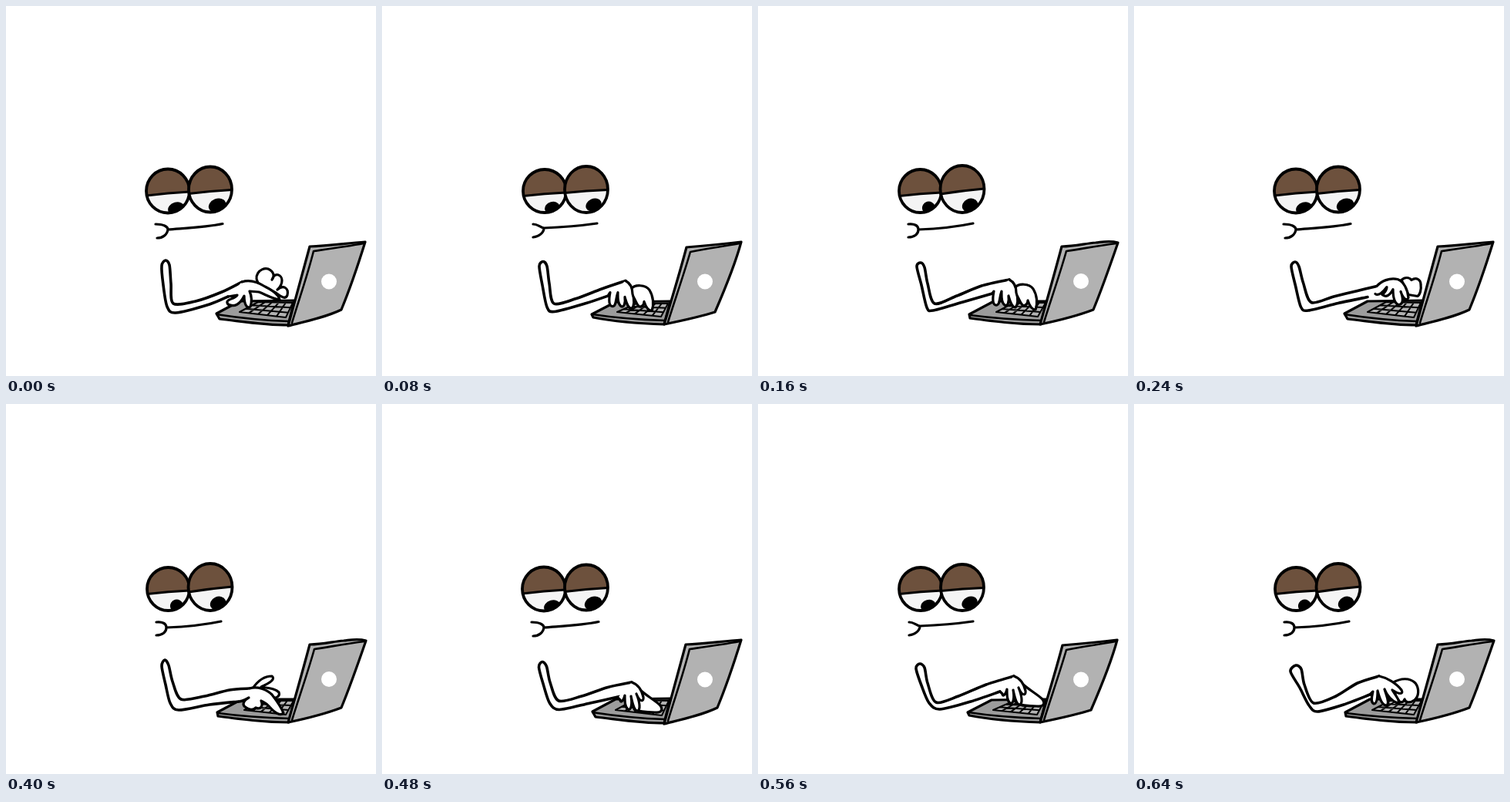
An HTML page for the animation above (0.72 s loop, 480x480 px).

```html
<!DOCTYPE html>
<html lang="en">
<head>
<meta charset="utf-8">
<title>Typing</title>
<style>
html, body { margin: 0; width: 100%; height: 100%; overflow: hidden; background: #fff; }
svg { display: block; width: 100vw; height: 100vh; }
</style>
</head>
<body>
<svg id="stage" viewBox="0 0 480 480" stroke="#000" stroke-linecap="round" stroke-linejoin="round"></svg>
<script>
const STEP = 80, STEPS = 9;
const BROWN = '#6d513d', GREY = '#b2b2b2', DARK = '#9c9c9c';

// Three redrawn versions of face and laptop give the line boil.
// eye: cx, cy, rx, ry; lid: left y, right y; pupil: cx, cy, rx, ry, angle
const looks = [
  {
    eyes: [
      { eye: [210, 240, 28, 28.5], lid: [246, 241], pupil: [221, 263, 11, 8.5, -15] },
      { eye: [265, 238, 28, 29.5], lid: [243.5, 238.5], pupil: [274, 258.5, 11.5, 8.5, -22] }
    ],
    mouth: 'M194 283C204 283 210 286 210 290C209 297 203 301 196 301M210 290C235 288 260 287 281 282.5',
    base: 'M273 399L303 383L374 382L366 414C335 414 305 409 277 406Z',
    edge: 'M273 400C305 405 335 408 367 409',
    keys: [[303, 397], [327, 384], [372, 385], [363, 404]],
    lid: 'M394 312C418 311 440 308 466 306C457 335 447 365 435 394C414 404 390 409 366 415C375 381 385 346 394 312Z',
    face: 'M399 318C420 315 442 312 464 308M399 318C391 350 380 381 371 411',
    badge: [419, 357.5]
  },
  {
    eyes: [
      { eye: [211, 240, 28, 28], lid: [246.5, 242], pupil: [221, 262, 10, 8, -15] },
      { eye: [265, 238, 28, 30], lid: [242.5, 238.5], pupil: [274.5, 258, 10.5, 8, -25] }
    ],
    mouth: 'M196 283C202 283 205 287 210 288C210 294 204 299 196 300M210 288C235 287 258 285 279 282',
    base: 'M272 400L303 384L374 383L366 413C335 412 305 410 274 404Z',
    edge: 'M273 400C305 405 335 407 367 408',
    keys: [[305, 397], [330, 386], [371, 386], [362, 403]],
    lid: 'M395 313C418 311 440 309 466 306C458 336 445 367 432 397C414 403 390 408 366 413C376 380 386 347 395 313Z',
    face: 'M400 319C420 315 442 312 464 308M400 319C391 350 380 381 371 410',
    badge: [419, 357.5]
  },
  {
    eyes: [
      { eye: [210.5, 240, 27.5, 28], lid: [246.5, 242], pupil: [221.5, 262, 8.5, 8.5, -15] },
      { eye: [265, 237.5, 28.5, 30.5], lid: [244, 237], pupil: [275, 258.5, 10.5, 8.5, -25] }
    ],
    mouth: 'M195 283C203 282 208 285 208 290C208 296 203 300 195 300M208 290C235 289 260 286 279 282',
    base: 'M274 400L306 383L374 383L367 413C335 413 305 409 275 405Z',
    edge: 'M275 401C305 405 335 407 368 408',
    keys: [[309, 397], [332, 385], [373, 385], [363, 403]],
    lid: 'M394 312C412 312 424 308 438 307C448 306 456 304 467 307C457 336 447 365 435 394C414 402 390 408 366 413C375 381 385 346 394 312Z',
    face: 'M400 318C420 315 442 311 465 308M400 318C391 350 380 381 371 410',
    badge: [419, 357]
  }
];

// arm: points from the lower wrist round the shoulder to the upper wrist
const poses = {
  0: {
    arm: [288, 377, 264, 387, 220, 398, 209, 390, 204, 362, 202, 337, 207, 330, 212, 336, 214, 360, 217, 386, 246, 383, 280, 371, 306, 358],
    far: 'M330 362C318 352 330 338 340 341C349 345 348 352 345 355C349 344 358 349 358 356C358 363 354 366 352 368C360 361 367 366 365 375C363 381 358 378 350 372Z',
    near: 'M306 358C318 354 328 359 336 364C346 369 354 375 355 381C346 380 336 374 328 371L316 370C319 377 319 384 317 390C313 393 309 388 309 376C303 388 296 391 288 387C283 380 296 381 300 375L288 377'
  },
  2: {
    arm: [304, 373, 266, 384, 227, 395, 219, 391, 212, 362, 206, 338, 211, 333, 216, 339, 220, 360, 229, 386, 258, 376, 290, 363, 326, 355],
    far: 'M333 366C338 359 352 360 357 367C362 375 363 386 360 394C355 394 352 388 350 382C350 386 347 390 343 388C339 384 338 376 334 374Z',
    near: 'M326 355C332 358 335 364 335 372C338 380 337 388 334 391C329 391 327 383 325 376C326 384 324 390 320 388C315 384 316 376 316 370C313 378 314 387 310 388C304 389 304 380 306 370L304 373'
  },
  4: {
    arm: [302, 382, 264, 387, 225, 395, 214, 390, 207, 364, 202, 338, 207, 331, 212, 337, 219, 358, 231, 383, 260, 378, 290, 376, 304, 372],
    far: 'M336 364C340 360 346 360 349 364C355 360 361 363 361 370C362 376 360 383 357 385L345 383Z',
    near: 'M304 372C310 365 320 361 331 363C339 366 344 376 345 387C343 392 338 388 335 379C339 389 338 396 332 396C327 394 325 386 325 376C321 384 316 387 311 383C316 379 317 376 317 373C312 380 306 385 302 382'
  },
  5: {
    arm: [302, 386, 264, 390, 224, 397, 213, 388, 207, 364, 202, 340, 206, 332, 211, 339, 216, 360, 227, 383, 258, 379, 290, 371, 316, 369],
    far: 'M320 369C326 360 334 353 345 353C350 357 342 362 331 367C342 369 349 369 354 374C356 379 350 383 344 380Z',
    near: 'M316 369C326 366 338 370 345 377C352 386 358 396 360 401C356 405 349 401 342 393C338 388 334 387 331 385C334 392 330 397 324 394C320 398 314 396 309 392C306 388 310 384 315 381C308 385 305 386 302 386'
  },
  7: {
    arm: [314, 373, 276, 386, 236, 396, 222, 388, 212, 365, 205, 343, 210, 337, 216, 342, 220, 362, 231, 387, 260, 379, 296, 364, 332, 353],
    far: 'M342 362C350 370 362 376 369 383C373 389 370 393 362 392C352 392 342 392 335 388Z',
    near: 'M332 353C341 356 345 364 347 372C348 378 343 380 338 368C343 380 343 388 340 390C335 391 333 380 331 371C333 382 331 390 327 388C323 385 323 378 323 370C321 378 317 380 317 376L314 373'
  },
  8: {
    arm: [306, 377, 272, 390, 238, 399, 227, 391, 215, 368, 203, 347, 210, 339, 217, 344, 221, 364, 233, 388, 262, 379, 290, 362, 318, 353],
    far: 'M335 362C346 355 358 355 365 362C371 370 369 380 364 384C357 389 352 387 351 383C349 388 345 388 343 384L340 380Z',
    near: 'M318 353C328 355 340 362 347 371C350 377 344 377 335 371C340 379 346 386 342 388C335 386 328 378 325 370C328 380 332 388 328 391C322 392 318 380 316 372C316 382 315 389 311 389C306 386 309 378 310 373L306 377'
  }
};

// In-between poses: average the arms and carry the later hand to the new wrist.
function between(a, b) {
  const arm = a.arm.map((v, i) => (v + b.arm[i]) / 2);
  const shift = [24, 25].map(i => arm[i] - b.arm[i]);
  return { ...b, arm, shift };
}
poses[1] = between(poses[0], poses[2]);
poses[3] = between(poses[2], poses[4]);
poses[6] = between(poses[5], poses[7]);

const path = (d, fill = 'none', width = 3.2) =>
  `<path d="${d}" fill="${fill}" stroke-width="${width}"/>`;

function spline(list) {
  const pts = [];
  for (let i = 0; i < list.length; i += 2) pts.push([list[i], list[i + 1]]);
  const at = i => pts[Math.max(0, Math.min(pts.length - 1, i))];
  let d = `M${pts[0]}`;
  for (let i = 0; i < pts.length - 1; i++) {
    const [p, q, r, s] = [at(i - 1), at(i), at(i + 1), at(i + 2)];
    const c1 = q.map((v, k) => v + (r[k] - p[k]) / 7);
    const c2 = r.map((v, k) => v - (s[k] - q[k]) / 7);
    d += `C${c1} ${c2} ${r}`;
  }
  return d;
}

function eyeball({ eye: [cx, cy, rx, ry], lid: [l, r], pupil: [px, py, pw, ph, turn] }, id) {
  const shape = `<ellipse cx="${cx}" cy="${cy}" rx="${rx}" ry="${ry}"`;
  const x0 = cx - rx, x1 = cx + rx;
  return `<clipPath id="${id}">${shape}/></clipPath>
    <g clip-path="url(#${id})">
      ${shape} fill="#f4f4f4" stroke="none"/>
      <ellipse cx="${px}" cy="${py}" rx="${pw}" ry="${ph}" transform="rotate(${turn} ${px} ${py})" fill="#000" stroke="none"/>
      ${path(`M${x0} ${l}L${x1} ${r}V${cy - ry - 4}H${x0}Z`, BROWN, 0)}
      ${path(`M${x0} ${l}Q${cx} ${(l + r) / 2 - 1} ${x1} ${r}`)}
    </g>
    ${shape} fill="none" stroke-width="3.8"/>`;
}

function keyboard([a, b, c, d]) {
  const mix = (p, q, k) => p.map((v, i) => v + (q[i] - v) * k);
  let lines = `M${a}L${b}L${c}L${d}Z`;
  for (const k of [1 / 3, 2 / 3]) lines += `M${mix(a, b, k)}L${mix(d, c, k)}`;
  for (const k of [0.2, 0.4, 0.6, 0.8]) lines += `M${mix(a, d, k)}L${mix(b, c, k)}`;
  return path(lines, GREY, 2);
}

function scene(n) {
  const look = looks[n % 3], pose = poses[n];
  const [dx, dy] = pose.shift || [0, 0];
  const hand = d => `<g transform="translate(${dx} ${dy})">${path(d, '#fff', 3.2)}</g>`;
  const [bx, by] = look.badge;
  return look.eyes.map((e, i) => eyeball(e, `eye${i}`)).join('') +
    path(look.mouth) +
    path(look.base, DARK) + path(look.edge, 'none', 2.4) + keyboard(look.keys) +
    hand(pose.far) + path(spline(pose.arm), '#fff', 3.6) + hand(pose.near) +
    path(look.lid, GREY) + path(look.face, 'none', 2.6) +
    `<circle cx="${bx}" cy="${by}" r="10" fill="#fff" stroke="none"/>`;
}

const stage = document.getElementById('stage');
const start = performance.now();
let shown = -1;

function draw(now) {
  const n = Math.floor(Math.max(0, now - start) / STEP) % STEPS;
  if (n !== shown) stage.innerHTML = scene(shown = n);
  requestAnimationFrame(draw);
}
draw(start);
</script>
</body>
</html>
```
